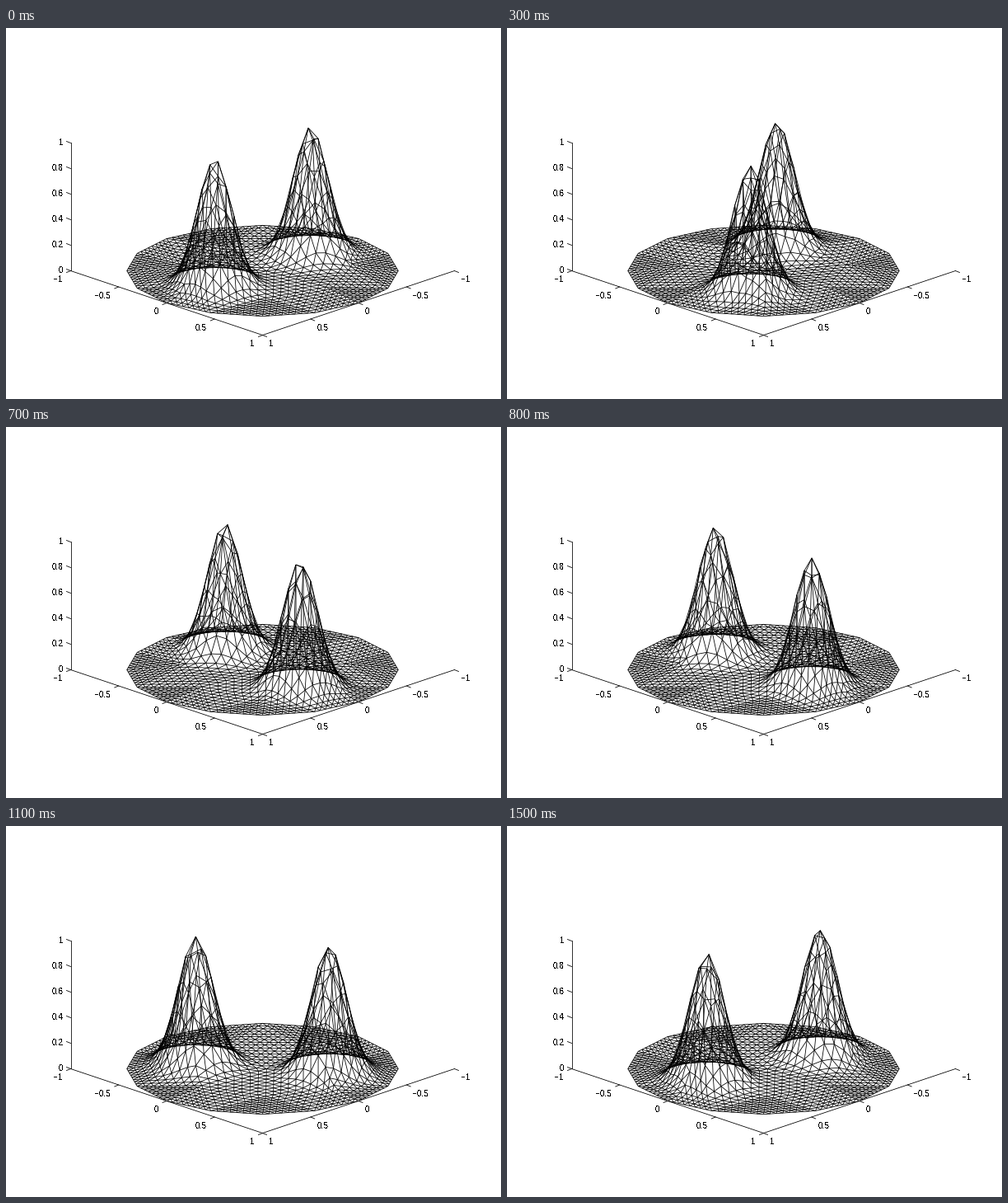
A matplotlib script for the animation above (1600 ms loop, 601 px wide and 450 px high).

```python
import numpy as np
import matplotlib.pyplot as plt
from matplotlib.animation import FuncAnimation
from matplotlib.collections import LineCollection
from matplotlib.tri import Triangulation, UniformTriRefiner

W, H, DPI = 601, 450, 72
FRAMES, INTERVAL = 16, 100
CX, CY = 311, 294                  # floor centre on screen
AXIS = np.array([116.5, 39.0])     # screen length of one axis unit
RX, RY = AXIS * np.sqrt(2)         # screen radii of the unit disc
HEIGHT = 155.0                     # screen height of z = 1
ORBIT, SHARPNESS = 0.5, 29.0
LINE = 0.8

plt.rcParams["font.family"] = "Liberation Sans"
plt.rcParams["text.antialiased"] = False


def ring(count, radius, turn=0.0):
    a = 2 * np.pi * (np.arange(count) + turn) / count
    return np.column_stack([radius * np.cos(a), radius * np.sin(a)])


def disc_mesh():
    """Coarse triangulated 16-gon, every edge split into 8."""
    rng = np.random.default_rng(4)
    inner = np.vstack([ring(7, 0.6, 0.25), ring(1, 0.0)])
    inner += rng.uniform(-0.03, 0.03, inner.shape)
    pts = np.vstack([ring(16, 1.0), inner])
    coarse = Triangulation(pts[:, 0], pts[:, 1])
    return UniformTriRefiner(coarse).refine_triangulation(subdiv=3)


mesh = disc_mesh()


def wire(i):
    """Screen segments of the surface with two opposite rotating bumps."""
    a = np.pi / 4 + np.pi * i / FRAMES
    z = np.zeros_like(mesh.x)
    for side in (1, -1):
        du = mesh.x - side * ORBIT * np.cos(a)
        dv = mesh.y - side * ORBIT * np.sin(a)
        z += np.exp(-SHARPNESS * (du**2 + dv**2))
    xy = np.column_stack([CX + RX * mesh.x, CY - RY * mesh.y - HEIGHT * z])
    return xy[mesh.edges]


fig = plt.figure(figsize=(W / DPI + 1e-6, H / DPI + 1e-6), dpi=DPI,
                 facecolor="white")
ax = fig.add_axes([0, 0, 1, 1])
ax.set_xlim(-0.5, W - 0.5)
ax.set_ylim(H - 0.5, -0.5)
ax.axis("off")


def line(x, y):
    ax.plot(x, y, color="black", lw=LINE)


def tick(x, y, dx, dy, text_dx, text_dy, value):
    line([x, x + dx], [y, y + dy])
    label = f"{value:g}".replace("-", "\u2212")
    ax.text(x + text_dx, y + text_dy + 4, label, fontsize=10, color="black",
            ha="right" if text_dx < 0 else "left", va="baseline")


left, right, front = CX - 2 * AXIS[0], CX + 2 * AXIS[0], CY + 2 * AXIS[1]
line([left, left], [CY - HEIGHT, CY])
line([left, CX, right], [CY, front, CY])

for value in np.linspace(-1, 1, 5):
    dx, y = AXIS[0] * (1 - value), front - AXIS[1] * (1 - value)
    tick(CX - dx, y, -5, 2, -9.5, 9.5, value)
    tick(CX + dx, y, 5, 2, 7.5, 9.5, value)
for value in np.linspace(0, 1, 6):
    tick(left, CY - HEIGHT * value, -5, -2, -9, -2, value)

surface = LineCollection(wire(0), colors="black", linewidths=LINE)
ax.add_collection(surface, autolim=False)


def update(i):
    surface.set_segments(wire(i))
    return [surface]


anim = FuncAnimation(fig, update, frames=FRAMES, interval=INTERVAL,
                     repeat=True, repeat_delay=0)
plt.show()
```
